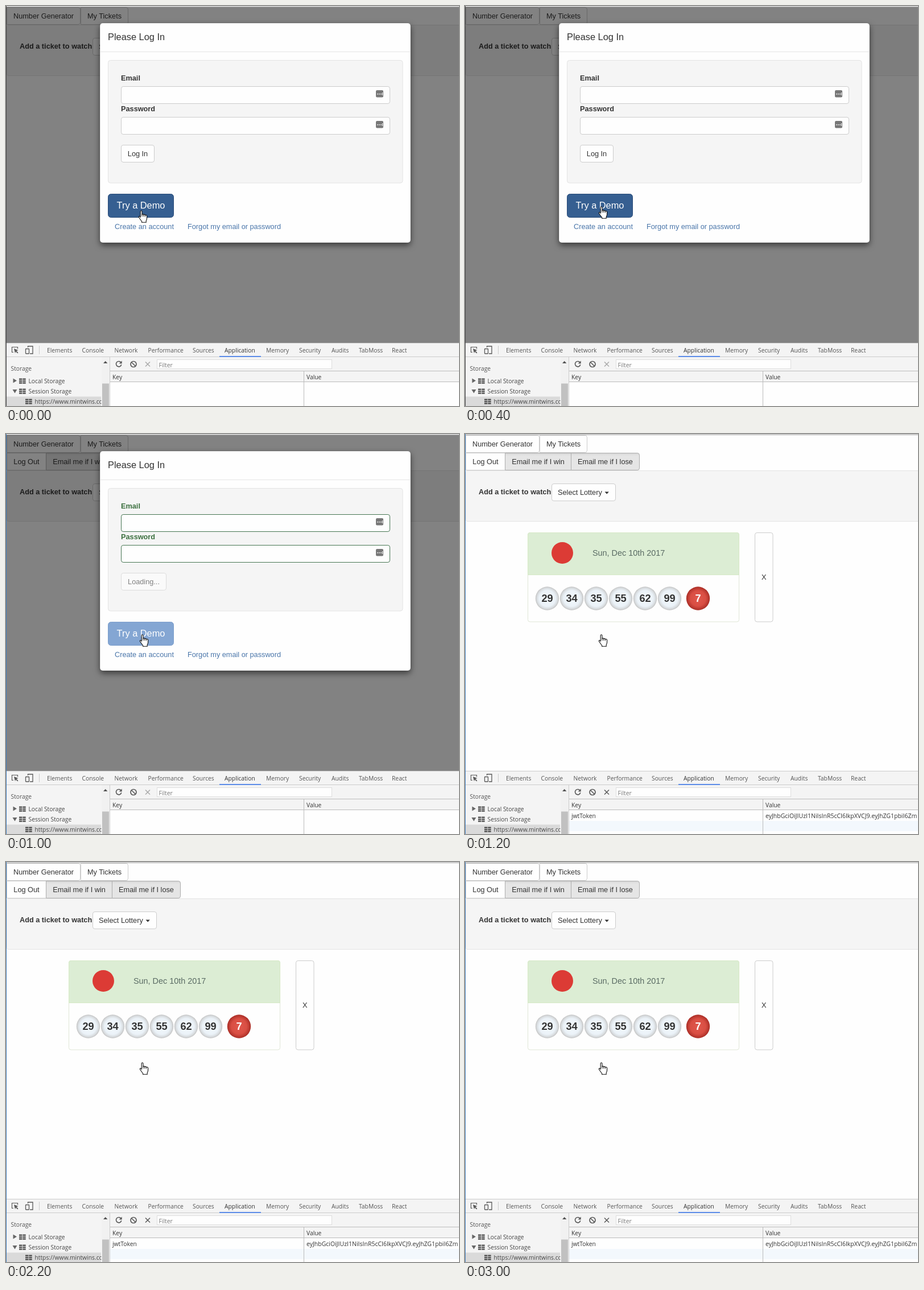
Animation, 796 px wide and 703 px high, one loop 3200 ms. Source, as an HTML page:

```html
<!DOCTYPE html>
<html lang="en">
<head>
<meta charset="utf-8">
<title>Ticket watch login</title>
<style>
  html, body { margin: 0; width: 100%; height: 100%; overflow: hidden; background: #fefefe; }
  svg { display: block; width: 796px; height: 703px; }
  text { font: 12.73px "Liberation Sans", Arial, sans-serif; fill: #333; white-space: pre; }
  text.b { font-weight: 700; }
  text.big { font-size: 16.36px; }
  text.date { font-size: 14.4px; fill: #5a6b64; }
  text.num { font-size: 18.2px; font-weight: 700; }
  text.dev { font: 10.3px "Open Sans", "Noto Sans", sans-serif; fill: #555; }
  text.mid { text-anchor: middle; }
</style>
</head>
<body>
<svg id="stage" viewBox="0 0 796 703" xmlns="http://www.w3.org/2000/svg">
  <defs>
    <radialGradient id="white">
      <stop offset="0" stop-color="#f3f9fe"/><stop offset=".68" stop-color="#ebf2f8"/>
      <stop offset=".88" stop-color="#d8dcdf"/><stop offset="1" stop-color="#c3c3c3"/>
    </radialGradient>
    <radialGradient id="red">
      <stop offset="0" stop-color="#e0584d"/><stop offset=".65" stop-color="#d94e43"/>
      <stop offset="1" stop-color="#ab2f27"/>
    </radialGradient>
    <linearGradient id="pressed" x2="0" y2="1">
      <stop offset="0" stop-color="#d5d5d5"/><stop offset=".16" stop-color="#e5e5e5"/>
    </linearGradient>
    <filter id="shadow" x="-10%" y="-10%" width="120%" height="125%">
      <feDropShadow dx="0" dy="4.5" stdDeviation="5.5" flood-opacity=".55"/>
    </filter>
    <clipPath id="tree"><path d="M0 617H167.5V703H0z"/></clipPath>
  </defs>
</svg>
<script>
const stage = document.getElementById('stage');
const LOOP = 3200, LOADING = 800, SIGNED = 1000, TICKETS = 1200;

const box = (x, y, w, h, fill, stroke = 'none', rx = 0, extra = '') =>
  `<rect x="${x}" y="${y}" width="${w}" height="${h}" rx="${rx}" fill="${fill}" stroke="${stroke}" ${extra}/>`;
const text = (x, y, str, cls = '', extra = '') =>
  `<text x="${x}" y="${y}" class="${cls}" ${extra}>${str}</text>`;
const path = (d, fill, stroke = 'none', width = 1, extra = '') =>
  `<path d="${d}" fill="${fill}" stroke="${stroke}" stroke-width="${width}" ${extra}/>`;
const line = (d, color) => path(d, 'none', color);
const group = (id, body, extra = '') => `<g id="${id}" ${extra}>${body}</g>`;

// Rounded only on the chosen sides, for joined buttons.
function button(x, y, w, h, label, left = 1, right = 1, pressed = false) {
  const l = left * 3.6, r = right * 3.6;
  const d = `M${x + l} ${y}h${w - l - r}q${r} 0 ${r} ${r}v${h - 2 * r}q0 ${r} ${-r} ${r}` +
    `h${l + r - w}q${-l} 0 ${-l} ${-l}v${2 * l - h}q0 ${-l} ${l} ${-l}z`;
  return path(d, pressed ? 'url(#pressed)' : '#fefefe', pressed ? '#adadad' : '#ccc') +
    text(x + w / 2, y + h / 2 + 4.6, label, 'mid');
}

function page() {
  const nav = button(1.5, 2.5, 129, 30, 'Number Generator', 0) + button(131.5, 2.5, 83, 30, 'My Tickets', 0);
  const user = button(1.5, 33.5, 69, 30, 'Log Out', 0, 0) +
    button(70.5, 33.5, 116, 30, 'Email me if I win', 0, 0, true) +
    button(186.5, 33.5, 120, 30, 'Email me if I lose', 0, 1, true);
  const well = box(1.5, 33.5, 800, 89, '#f5f5f5', '#e3e3e3', 3) +
    text(24, 75, 'Add a ticket to watch', 'b') +
    button(152.5, 56.5, 112, 30, '') + text(163, 76, 'Select Lottery') +
    path('M245.5 70.5h7.4l-3.7 4z', '#333');
  return box(0, 0, 796, 592, '#fefefe') + group('well', well) + nav +
    group('user', user) + group('card', card());
}

function card() {
  const balls = [29, 34, 35, 55, 62, 99, 7].map((n, i) => {
    const last = i === 6, x = 144.5 + 43 * i + (last ? 7 : 0);
    return `<circle cx="${x}" cy="289" r="20.7" fill="url(#${last ? 'red' : 'white'})"/>` +
      text(x, 295, n, 'num mid', last ? 'style="fill:#fff"' : '');
  }).join('');
  return box(110.5, 173.5, 371, 156.5, '#fefefe', '#dfe6d6', 3.6) +
    path('M110.5 247.5V177q0-3.5 3.5-3.5h364q3.5 0 3.5 3.5v70.5z', '#dcedd4', '#d6e9c6') +
    '<circle cx="171" cy="209" r="19" fill="#dc3b35"/>' +
    text(224, 214, 'Sun, Dec 10th 2017', 'date') + balls +
    button(509.5, 173.5, 31.5, 156.5, 'X');
}

function field(y, label) {
  const dots = [653, 656, 659].map(x => box(x - .8, y + 12.9, 1.6, 1.6, '#fff')).join('');
  return text(202, y - 10, label, 'b label') +
    box(202.5, y + .5, 472, 30, '#fefefe', '#ccc', 3.6, 'class="input"') +
    box(650, y + 7, 13, 12.5, '#777', 'none', 2) + dots + line(`M661.5 ${y + 11}v5`, '#fff');
}

function modal() {
  return box(165, 30, 546, 386, '#fefefe', 'rgba(0,0,0,.2)', 5, 'filter="url(#shadow)"') +
    text(179, 60, 'Please Log In', 'big') + line('M165 80.5H711', '#e5e5e5') +
    box(179.5, 95.5, 517.5, 215.5, '#f5f5f5', '#e3e3e3', 4) +
    field(141, 'Email') + field(195, 'Password') +
    group('login', button(202.5, 244.5, 58, 30, 'Log In')) +
    group('loading', button(202.5, 244.5, 79, 30, 'Loading...'), 'opacity=".6"') +
    box(179.5, 330.5, 115, 41, '#365f91', '#2a4c78', 5, 'id="demo"') +
    text(237, 356, 'Try a Demo', 'big mid', 'style="fill:#fff"') +
    text(191, 392, 'Create an account', 'link') + text(319, 392, 'Forgot my email or password', 'link');
}

function treeRow(y, indent, label, arrow) {
  let cells = '';
  for (let i = 0; i < 6; i++)
    cells += box(indent + (i % 2) * 6.3, y - 8.5 + (i >> 1) * 3.4, 5.4, 2.5, '#555');
  return cells + path(arrow, '#666') + text(indent + 16.5, y, label, 'dev', 'style="fill:#444"');
}

function devtools() {
  const tabs = [['Elements', 72], ['Console', 133.5], ['Network', 190.5], ['Performance', 249.5],
    ['Sources', 328], ['Application', 384], ['Memory', 457], ['Security', 515],
    ['Audits', 572], ['TabMoss', 620], ['React', 678]];
  const token = 'eyJhbGciOiJIUzI1NiIsInR5cCI6IkpXVCJ9.eyJhZG1pbiI6Zm';
  const dark = 'style="fill:#333"';
  const bar = box(0, 592, 796, 111, '#f4f4f4') + line('M0 592.5H796M0 616.5H796', '#ccc') +
    path('M13 608.5h-2.5v-9h10v3', 'none', '#5a5a5a', 1.2) +
    path('M14 602l7.5 3-3 1.2 3 3-1.3 1.3-3-3-1.2 2.8z', '#5a5a5a') +
    path('M38.5 600v-2h8.500v13h-5', 'none', '#5a5a5a', 1.3) +
    box(34.5, 602.5, 6, 8.5, '#f4f4f4', '#5a5a5a', .8, 'stroke-width="1.3"') +
    line('M58.5 597v15', '#ccc') +
    tabs.map(([name, x]) => text(x, 609, name, 'dev', name === 'Application' ? dark : '')).join('') +
    box(375, 615, 73, 2, '#5c8ce8');
  const side = group('side',
    box(1, 686.5, 166, 17, '#dadada') + text(8.5, 641, 'Storage', 'dev') +
    treeRow(663, 23, 'Local Storage', 'M12.500 654.500l6.500 4-6.500 4z') +
    treeRow(681, 23, 'Session Storage', 'M11.500 674h8l-4 6.500z') +
    treeRow(699, 34, 'https://www.mintwins.com', ''), 'clip-path="url(#tree)"') +
    box(168, 617, 14, 86, '#f1f1f1') + box(169, 663.5, 12, 40, '#c1c1c1') +
    path('M171 628l3.700-4 3.700 4z', '#505050') + line('M182.500 617V703', '#ccc');
  const table = box(183, 661, 613, 42, '#fefefe') +
    group('row', box(183, 680, 613, 18, '#f3f8fd') + text(187, 675, 'jwtToken', 'dev', dark) +
      text(528, 675, token, 'dev', 'style="fill:#333;font-size:10.5px"')) +
    line('M183 641.5H796M183 660.5H796M523.5 642V703', '#bbb') +
    text(187, 655.5, 'Key', 'dev', dark) + text(528, 655.5, 'Value', 'dev', dark);
  const tools = path('M202 626.3a4.700 4.700 0 1 0 .8 4', 'none', '#5a5a5a', 1.6) +
    path('M203.700 623.500v5h-5z', '#5a5a5a') +
    path('M229 629.500a5 5 0 1 1-10 0a5 5 0 1 1 10 0M220.500 626l7 7', 'none', '#5a5a5a', 1.7) +
    path('M245 625.500l8 8m0-8l-8 8', 'none', '#5a5a5a', 1.5, 'id="clear"') +
    box(265.5, 621.5, 307, 16, '#fefefe', '#ddd') +
    text(268.5, 634.5, 'Filter', 'dev', 'style="fill:#777"');
  return bar + side + table + tools;
}

const hand = 'M3.200 12V2.600Q3.200 .8 4.600 .8Q6 .8 6 2.600V7.300Q7.600 6.300 8.600 7.600Q10.200 6.900 11.200 8.300' +
  'Q14.600 7.800 14.600 11V14Q14.600 16.300 13.200 18.600V21.300H5.600V19.500Q3.500 17 1.500 14Q-.4 11.500 .8 10.700Q2 10.200 3.200 12z';

stage.insertAdjacentHTML('beforeend',
  page() +
  group('dialog', box(0, 0, 796, 592, '#000', 'none', 0, 'opacity=".49"') + modal()) +
  devtools() +
  box(0, 0, 796, 1, '#e9e9e9') + box(0, 1, 796, 1, '#aaa') +
  box(0, 0, 1, 703, '#444', 'none', 0, 'id="edge"') +
  group('cursor', path(hand, '#fff', '#111', 1.1) + line('M6 7v4M8.700 8v3M11.400 8.500v3', '#111')));

const el = id => document.getElementById(id);
const show = (id, on) => el(id).setAttribute('display', on ? 'inline' : 'none');
const paint = (selector, prop, color) =>
  stage.querySelectorAll(selector).forEach(node => { node.style[prop] = color; });

function render(t) {
  const loading = t >= LOADING, signed = t >= SIGNED, tickets = t >= TICKETS;
  show('dialog', !tickets);
  show('card', tickets);
  show('row', tickets);
  show('user', signed);
  show('login', !loading);
  show('loading', loading);
  el('well').setAttribute('transform', `translate(0 ${signed ? 31 : 0})`);

  paint('.label', 'fill', signed ? '#3c703f' : loading ? '#365c3a' : '#333');
  paint('.input', 'stroke', signed ? '#477653' : loading ? '#8a8d8a' : '#ccc');
  paint('.link', 'fill', loading && !signed ? '#41679a' : '#4a76aa');
  paint('#demo', 'fill', loading ? '#84a6d3' : '#365f91');
  paint('#demo', 'stroke', loading ? '#7d9fcb' : '#2a4c78');
  paint('#edge', 'fill', loading ? '#3f7dbb' : '#444');
  paint('#clear', 'stroke', tickets ? '#5a5a5a' : '#aaa');

  const step = Math.min(2, Math.floor(t / 200)) / 2;
  el('cursor').setAttribute('transform', `translate(${233 + 2 * step} ${359 - 7 * step})`);
}

const start = performance.now();
function tick() {
  render((performance.now() - start) % LOOP);
  requestAnimationFrame(tick);
}
render(0);
requestAnimationFrame(tick);
</script>
</body>
</html>
```
